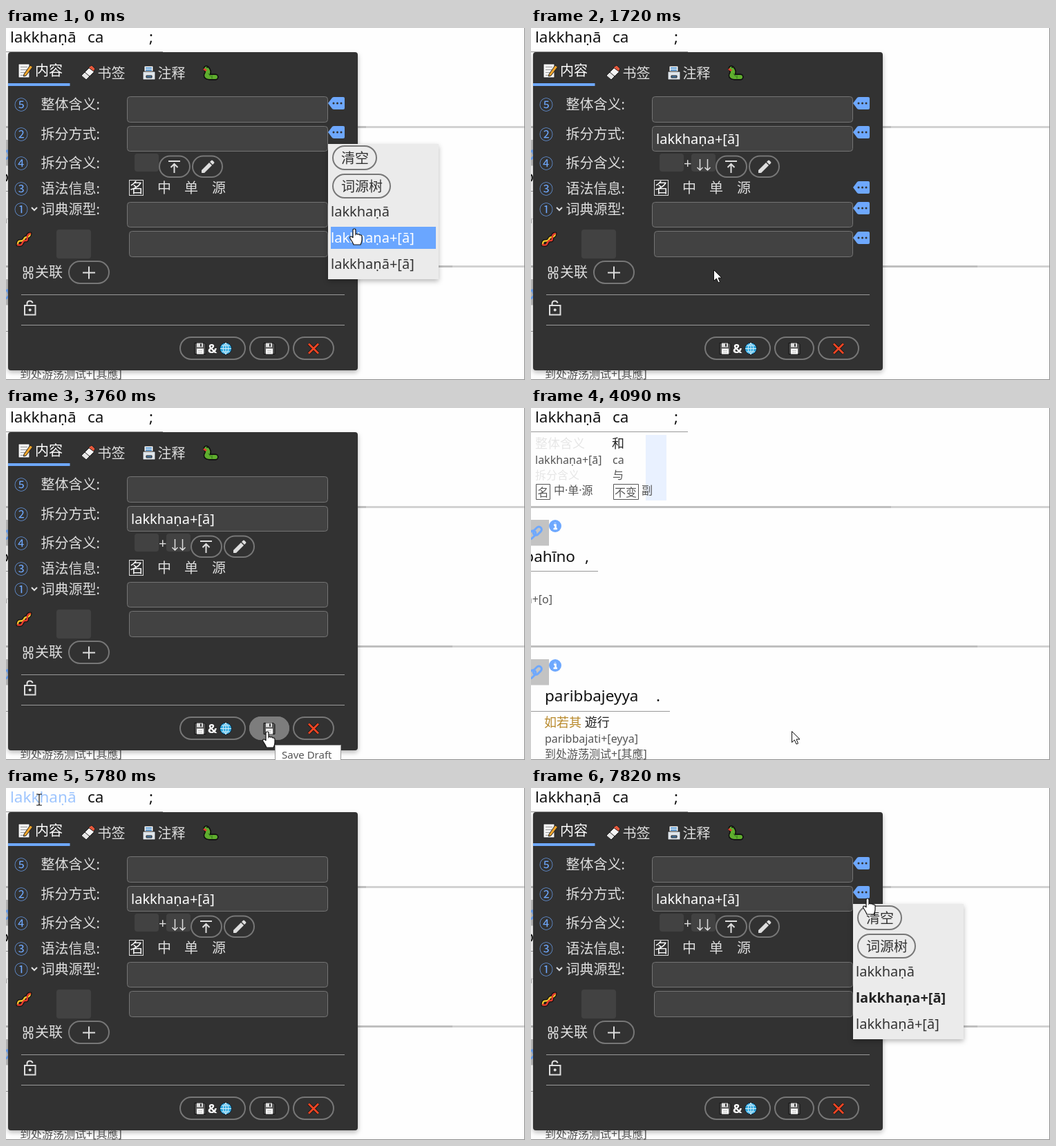
These frames come from a looping animation (751 by 510 pixels, 8000 ms). An HTML page:

```html
<!DOCTYPE html>
<html lang="zh-CN">
<head>
<meta charset="utf-8">
<title>Word editor</title>
<style>
html, body { margin: 0; width: 100%; height: 100%; overflow: hidden; background: #fefefe; }
svg { display: block; width: 751px; height: 510px; }
text { font: 20px "Noto Sans", "Noto Sans CJK SC", "Noto Sans CJK", sans-serif; white-space: pre; }
#page text { font-size: 16px; fill: #555; }
#page .word { font-size: 22.5px; fill: #111; }
#page .mean { font-size: 18px; fill: #222; }
#page .hint { fill: #e6e6e6; }
#dialog text { fill: #dedede; }
#dialog .num { fill: #6ea8fe; }
#dialog .on { fill: #fff; }
#menu text { fill: #333; }
.pill { fill: none; stroke: #777; stroke-width: 2; }
.field { fill: #424242; stroke: #747474; }
.slot { fill: #424242; }
.line { fill: none; stroke: #dedede; stroke-width: 2; }
.mid { text-anchor: middle; }
.end { text-anchor: end; }
</style>
</head>
<body>
<svg viewBox="0 0 751 510">
  <defs>
    <filter id="soft" x="-10%" y="-10%" width="120%" height="120%">
      <feDropShadow dx="0" dy="3" stdDeviation="3.5" flood-opacity=".28"/>
    </filter>
    <g id="tag">
      <path d="M0 0L6-8Q7-9 9-9H22Q24-9 24-7V7Q24 9 22 9H9Q7 9 6 8Z" fill="#6ea8fe"/>
      <path d="M8 0h.01M13.5 0h.01M19 0h.01" stroke="#333" stroke-width="3" stroke-linecap="round"/>
    </g>
    <g id="disk">
      <path d="M-8-8H6L8-6V8H-8Z" fill="#555" stroke="#111"/>
      <rect x="-5" y="-8" width="9" height="6" fill="#ddd"/>
      <rect x="0" y="-7" width="2" height="4" fill="#333"/>
      <rect x="-5" y="0" width="10" height="8" fill="#fff"/>
      <path d="M-3 3H3M-3 5.500H3" stroke="#bbb"/>
    </g>
    <g id="info">
      <rect y="-9" width="26" height="37.500" fill="#c3c3c3"/>
      <g transform="translate(5 10) rotate(-45)" fill="none" stroke="#6ea8fe" stroke-width="3">
        <rect x="-12" y="-5" width="14" height="8" rx="4"/>
        <rect x="-2" y="-3" width="14" height="8" rx="4"/>
      </g>
      <circle cx="35" r="9" fill="#6ea8fe"/>
      <path d="M35-5v.5M33-1.500h2.500V4M32.500 4h5.500" fill="none" stroke="#fff" stroke-width="2.500"/>
    </g>
  </defs>

  <g id="page">
    <rect width="751" height="510" fill="#fefefe"/>
    <rect x="166" y="39" width="30" height="95" fill="#e9f1ff"/>
    <path d="M0 34.500H227M0 236.500H97M0 439.500H201" stroke="#999"/>
    <path d="M0 143.500H521M0 345.500H646" stroke="#bfbfbf" stroke-width="3"/>
    <path d="M521 143.500H751M646 345.500H751" stroke="#d2d2d2" stroke-width="3"/>
    <text class="word" id="word" x="6" y="21">lakkhaṇā</text>
    <text class="word" x="118" y="21">ca</text>
    <text class="word" x="207" y="21">;</text>
    <text class="mean hint" style="fill:#e6e6e6" x="6" y="58">整体含义</text>
    <text x="6" y="81">lakkhaṇa+[ā]</text>
    <text style="fill:#e6e6e6" x="6" y="103">拆分含义</text>
    <text class="mid" x="17.500" y="128">名</text>
    <text x="33" y="125">中·单·源</text>
    <text class="mean" x="117" y="58">和</text>
    <text x="118" y="81">ca</text>
    <text x="118" y="103">与</text>
    <text x="121" y="128">不变</text>
    <text x="160" y="125">副</text>
    <path d="M7.500 110.500h20v22h-20zM119.500 110.500h36v22h-36z" fill="none" stroke="#555"/>
    <use href="#info" y="171"/>
    <text class="word end" x="64" y="223">pahīno</text>
    <text class="word" x="78" y="223">,</text>
    <text class="end" x="31" y="283">ana+[o]</text>
    <use href="#info" y="373"/>
    <text class="word" x="20" y="425">paribbajeyya</text>
    <text class="word" x="181" y="425">.</text>
    <text class="mean" x="19" y="462"><tspan fill="#b8892b">如若其</tspan> 遊行</text>
    <text x="20" y="485">paribbajati+[eyya]</text>
    <text x="20" y="507">到处游荡测试+[其應]</text>
    <path d="M750.500 0V509.500H0" fill="none" stroke="#8a8a8a"/>
  </g>

  <g id="dialog">
    <rect x="3" y="35" width="506" height="461" rx="4" fill="#333" filter="url(#soft)"/>
    <rect x="3" y="80" width="89.500" height="4" fill="#6ea8fe"/>
    <text class="on" x="42" y="68.500">内容</text>
    <text x="132.500" y="72.500">书签</text>
    <text x="219.500" y="72.500">注释</text>

    <g stroke="#222">
      <path d="M18 52H34V72H18Z" fill="#f4f4f4"/>
      <path d="M21 56.500H31M21 60.500H31M21 64.500H28M21 68.500H27" stroke="#999"/>
      <path d="M26 67L35 54L38.500 56.500L29 69L25.500 70Z" fill="#f2a52c"/>
      <path d="M109 69L121 57L128 63L116 75Z" fill="#f4f4f4"/>
      <path d="M109 69L114 64L121 70L116 75Z" fill="#e5e5e5"/>
      <path d="M119 57L124 54L129 59L127 63Z" fill="#e5573b"/>
      <path d="M200 55H213V66H200Z" fill="#fff"/>
      <path d="M198 63H216V75H198Z" fill="#dfe5ea"/>
      <path d="M202 58H211M202 61H211" stroke="#5b9bd5" stroke-width="2"/>
      <path d="M203 69H211V72H203Z" fill="#4a7ba8"/>
    </g>
    <g fill="none" stroke-linecap="round" stroke-linejoin="round">
      <path id="worm" d="M290 59Q294 63 291 67T297 71H303" stroke="#111" stroke-width="9"/>
      <use href="#worm" style="stroke:#5aa02c"/>
      <path d="M290 59Q294 63 291 67T297 71H303" stroke="#5fae2e" stroke-width="6"/>
      <path d="M293 66l3 4M298 69v4" stroke="#2d6d18"/>
      <path d="M287 60l2 1" stroke="#e03c31" stroke-width="3"/>
      <path d="M291 57h.01" stroke="#111" stroke-width="2"/>
    </g>

    <g id="rows"></g>
    <path class="line" stroke-width="1.500" d="M37 260l4 4 4-4"/>
    <rect class="field" x="175.500" y="99.500" width="290" height="37" rx="4"/>
    <rect class="field" x="175.500" y="142.500" width="290" height="36" rx="4"/>
    <rect class="field" x="175.500" y="252.500" width="290" height="36" rx="4"/>
    <rect class="field" x="178.500" y="294.500" width="287" height="37" rx="4"/>
    <rect class="slot" x="186" y="182" width="35" height="26" rx="4"/>
    <rect class="slot" x="73" y="292" width="50" height="42" rx="4"/>

    <g id="split">
      <text class="on" x="181" y="168">lakkhaṇa+[ā]</text>
      <text x="221" y="203">+</text>
      <rect class="slot" x="232" y="182" width="35" height="26" rx="4"/>
      <path class="line" style="stroke-width:1.500" d="M244.500 190v16m-4-4l4 4 4-4M255.500 190v16m-4-4l4 4 4-4"/>
    </g>
    <g id="tools">
      <rect class="pill" x="268" y="185.500" width="44" height="30.500" rx="15.250"/>
      <rect class="pill" x="316" y="185.500" width="43" height="30.500" rx="15.250"/>
      <path class="line" d="M281 193h17M289.500 210V197m-5 5l5-5 5 5"/>
      <path d="M329 210v-4l11-11 4 4-11 11zM341 194l2-2q1-1 2 0l2 2q1 1 0 2l-2 2z" fill="#dedede"/>
    </g>

    <text class="mid on" x="189" y="239">名</text>
    <text class="mid" x="229" y="239">中</text>
    <text class="mid" x="268" y="239">单</text>
    <text class="mid" x="308" y="239">源</text>
    <rect x="178.500" y="220.500" width="20" height="22" fill="none" stroke="#dedede"/>

    <g fill="none" stroke-linecap="round">
      <path d="M17 314C17 304 24 312 26 306S34 306 35 298M17 314C26 317 22 307 28 308S27 299 35 298" stroke="#111" stroke-width="5"/>
      <path d="M17 314C17 304 24 312 26 306S34 306 35 298" stroke="#f3c72c" stroke-width="2.500"/>
      <path d="M17 314C26 317 22 307 28 308S27 299 35 298" stroke="#e23b2e" stroke-width="2.500"/>
    </g>
    <g class="line" style="stroke-width:1.500">
      <rect x="25.500" y="346" width="4" height="7" rx="2"/><rect x="34.500" y="346" width="4" height="7" rx="2"/>
      <rect x="25.500" y="356" width="4" height="7" rx="2"/><rect x="34.500" y="356" width="4" height="7" rx="2"/>
      <path d="M29 352l6 5M35 352l-6 5"/>
    </g>
    <text x="42" y="361">关联</text>
    <rect class="pill" x="91" y="338" width="58" height="32" rx="16"/>
    <path class="line" d="M111 354.500h18M120 345.500v18"/>
    <path d="M22 386.500H490M22 430.500H490" stroke="#9a9a9a"/>
    <path class="line" d="M27 402h15.500v13.500H27zM30.500 402v-2.500q0-4 4-4 3.500 0 4 3"/>
    <circle cx="34.700" cy="408.500" r="2" fill="#dedede"/>

    <rect class="pill" x="252" y="448" width="94" height="32" rx="16"/>
    <rect class="pill" x="353" y="448" width="56" height="32" rx="16"/>
    <rect class="pill" x="416" y="448" width="58" height="32" rx="16"/>
    <rect id="hoverAll" x="251" y="447" width="96" height="34" rx="17" fill="#7d7d7d"/>
    <rect id="hoverSave" x="352" y="447" width="58" height="34" rx="17" fill="#7d7d7d"/>
    <use href="#disk" x="281" y="464.500"/>
    <text class="on" style="font-size:18px;font-weight:700" x="292" y="471">&amp;</text>
    <circle cx="318" cy="464.500" r="8.500" fill="#2fa8e0" stroke="#123"/>
    <path d="M310 464.500h16M318 456v17M312 460h12M312 469h12M318 456q-8 8.500 0 17M318 456q8 8.500 0 17" fill="none" stroke="#d5f0fb"/>
    <use href="#disk" x="381" y="464.500"/>
    <path d="M438 457.500l14 14M452 457.500l-14 14" stroke="#111" stroke-width="4.500"/>
    <path d="M438 457.500l14 14M452 457.500l-14 14" stroke="#ee4524" stroke-width="3"/>

    <g id="tags">
      <use href="#tag" x="466" y="109"/><use href="#tag" x="466" y="151"/><use href="#tag" x="466" y="231"/>
      <use href="#tag" x="466" y="261"/><use href="#tag" x="466" y="304"/>
    </g>
  </g>

  <g id="menu">
    <rect x="466" y="168" width="160" height="196" fill="#ebebeb" filter="url(#soft)"/>
    <rect id="hoverClear" x="473" y="171" width="63" height="34" rx="17" fill="#b8b8b8"/>
    <rect class="pill" x="473" y="171" width="63" height="34" rx="17"/>
    <rect class="pill" x="473" y="212" width="83" height="34" rx="17"/>
    <text x="485" y="196">清空</text>
    <text x="485" y="237">词源树</text>
    <text x="470" y="273">lakkhaṇā</text>
    <g id="picked">
      <rect x="470" y="288" width="152" height="32" fill="#6aa6ff"/>
      <text style="fill:#fff" x="470" y="311">lakkhaṇa+[ā]</text>
    </g>
    <text id="current" style="font-weight:700;fill:#222" x="470" y="311">lakkhaṇa+[ā]</text>
    <text x="470" y="349">lakkhaṇā+[ā]</text>
  </g>

  <g id="tip">
    <rect x="389.500" y="488.500" width="95" height="30" fill="#fff" stroke="#999"/>
    <text style="font-size:15px" fill="#555" x="399" y="508">Save Draft</text>
  </g>

  <g id="cursor">
    <path id="arrow" d="M.5 .5V16.500L4.300 13L7 19L9.500 18L7 12H12Z" fill="#fff" stroke="#111"/>
    <path id="hand" d="M-2 11V2Q-2 0 0 0T2 2V8Q3 6.500 5 8 7 7 8 9 11 8.500 11 11V16Q11 19 9 23H-1Q-2 20-6 14-7 11-5 11-3 11-2 13Z" fill="#fff" stroke="#111" stroke-width="1.200"/>
    <path id="beam" d="M-4-8H-1L0-7 1-8H4M0-7V7M-4 8H-1L0 7 1 8H4" fill="none" stroke="#111" stroke-width="1.200"/>
  </g>
</svg>
<script>
const LOOP = 8000;
const $ = id => document.getElementById(id);

const rows = [["⑤", "整体含义", 118], ["②", "拆分方式", 161], ["④", "拆分含义", 203],
  ["③", "语法信息", 240], ["①", "词典源型", 270]];
$("rows").innerHTML = rows.map(([num, label, y]) =>
  `<text class="num" x="12" y="${y + 1}">${num}</text><text x="50.5" y="${y}">${label}:</text>`).join("");

// Hold each value from its time until the next one.
function hold(id, prop, steps) {
  const frames = steps.map(([t, v]) => ({ [prop]: v, offset: t / LOOP, easing: "step-end" }));
  frames.push({ [prop]: steps.at(-1)[1], offset: 1 });
  $(id).animate(frames, { duration: LOOP, iterations: Infinity });
}

// Visible only inside the given [from, to] spans.
function show(id, ...spans) {
  const steps = spans[0]?.[0] === 0 ? [] : [[0, 0]];
  for (const [from, to] of spans) {
    steps.push([from, 1]);
    if (to < LOOP) steps.push([to, 0]);
  }
  hold(id, "opacity", steps);
}

show("dialog", [0, 4090], [5780, LOOP]);
show("tags", [0, 2070], [6460, LOOP]);
show("split", [1030, LOOP]);
show("menu", [0, 1720], [6800, 7480], [7820, LOOP]);
show("picked", [0, 1720]);
show("current", [6800, LOOP]);
show("hoverClear", [6800, 7140]);
show("hoverAll", [2070, 3070]);
show("hoverSave", [3070, 4090]);
show("tip", [3760, 4090]);
hold("tools", "transform", [[0, "translate(-46px, 0px)"], [1030, "translate(0px, 0px)"]]);
hold("word", "fill", [[0, "#111"], [5450, "#9ec5fe"], [6120, "#111"]]);

const moves = [
  [0, "hand", 504, 291], [340, "hand", 504, 300], [1380, "arrow", 281, 191], [1720, "arrow", 264, 350],
  [2070, "hand", 302, 475], [2400, "hand", 314, 454], [2730, "hand", 333, 466], [3070, "hand", 378, 469],
  [4090, "arrow", 377, 468], [4430, "arrow", 332, 422], [4780, "arrow", 111, 152], [5120, "arrow", 51, 27],
  [5450, "beam", 48, 17], [6120, "arrow", 76, 52], [6460, "hand", 468, 150],
  [7140, "hand", 486, 149], [7480, "hand", 487, 160]
];
hold("cursor", "transform", moves.map(([t, , x, y]) => [t, `translate(${x}px, ${y}px)`]));
for (const kind of ["arrow", "hand", "beam"])
  hold(kind, "opacity", moves.map(([t, k]) => [t, k === kind ? 1 : 0]));
</script>
</body>
</html>
```
